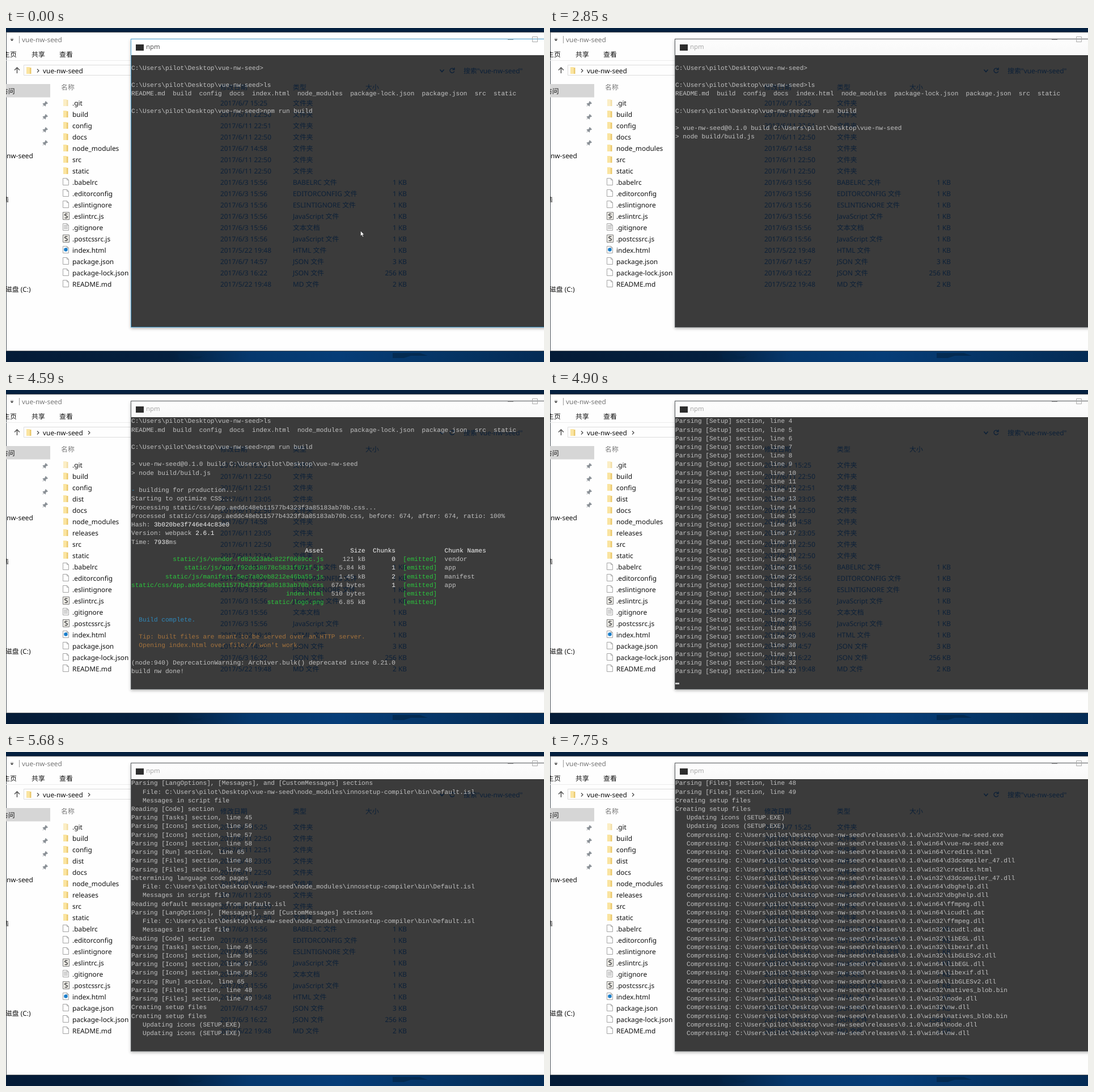
Recreate the animation shown at these times as an HTML page. Size 949x590 px, loop 8000 ms.

```html
<!DOCTYPE html>
<html lang="zh-CN">
<head>
<meta charset="utf-8">
<title>npm run build</title>
<style>
html, body { margin: 0; width: 100%; height: 100%; overflow: hidden; background: #fff; }
#stage { position: relative; width: 949px; height: 590px; overflow: hidden; background: #fefefe;
  font: 11.9px/20px "Noto Sans", "Open Sans", "Noto Sans CJK SC", "Noto Sans CJK", sans-serif;
  color: #111; text-rendering: geometricPrecision; }
#stage div, #stage svg, #stage pre { position: absolute; }
#stage .layer { left: 0; top: .5px; width: 949px; height: 590px; }
.t { white-space: pre; }
.gray { color: #777; }
#under .t { color: #0c2038; }
#panel { left: 220px; top: 19px; width: 740px; height: 508px; border: 1px solid #5a5e61;
  box-shadow: 0 2px 5px rgba(0,0,0,.3); background: #3b3b3b; }
#bar { left: 0; top: 0; width: 100%; height: 28px; background: linear-gradient(#fdfdfd, #f8f8f8); color: #aaa; }
#panel.active { border-color: #4ba3d3; }
.active #bar { background: #fff; color: #555; }
#term { left: 221px; top: 49.3px; margin: 0; color: #c2c2c2;
  font: 11.1px/15.23px "Liberation Mono", monospace; }
.w { color: #f4f4f4; } .g { color: #2bc53d; } .b { color: #2f88ba; } .o { color: #a5733d; }
#caret { left: 221px; width: 7px; height: 3px; background: #c8c8c8; }
#mouse { left: 0; top: 0; }
</style>
</head>
<body>
<div id="stage">
  <svg width="949" height="590">
    <defs>
      <linearGradient id="desk">
        <stop offset="0" stop-color="#041b37"/><stop offset=".31" stop-color="#04203f"/>
        <stop offset=".45" stop-color="#06386d"/><stop offset=".62" stop-color="#063d78"/>
        <stop offset=".85" stop-color="#053362"/><stop offset="1" stop-color="#042b55"/>
      </linearGradient>
      <g id="folder"><path d="M0 0h6v12h-6z" fill="#fae4a0"/><path d="M6 1h2.5v11h-2.5z" fill="#ebc96e"/></g>
      <path id="page" d="M.5.5h7l3 3v9h-10z M7.5.5v3h3" fill="#fff" stroke="#a4a4a4"/>
      <path id="pin" d="M5 0l4 4-1 1-1-.3-2 2 .2 2-1 .8-2-2-2.2 2.1-.5-.5 2-2.2-2-2 .8-1 2 .2 2-2-.3-1z" fill="#8a9096"/>
    </defs>
    <path d="M0 0h949v7H0z" fill="#04203f"/>
    <path d="M0 571h949v19H0z" fill="url(#desk)"/>
    <path d="M303 576h20l8 4h16l-6 4h-36z M682 574h48l14 5h-30l-12 4h-20z" fill="#042548" opacity=".7"/>
    <path d="M.5 7v564M0 7.5h949M0 570.5h949" stroke="#4c5359"/>
    <path d="M7.5 20h6l-3 3z" fill="#333"/>
    <path d="M8 18.5h5M23.5 14v13" stroke="#999"/>
    <path d="M0 57.5h221" stroke="#ececec"/>
    <path d="M221 65.5H31.5v18H221" fill="none" stroke="#dcdcdc"/>
    <path d="M19.5 80v-10m-4.5 4.5l4.5-4.5l4.5 4.5" fill="none" stroke="#5c5c5c" stroke-width="1.6"/>
    <use href="#folder" x="36" y="69"/>
    <path d="M55 72.5l3 3-3 3" fill="none" stroke="#444" stroke-width="1.2"/>
    <path id="chevron" d="M145 72.5l3 3-3 3" fill="none" stroke="#444" stroke-width="1.2"/>
    <path d="M0 99h78v23.5H0z" fill="#d6d6d6"/>
    <use href="#pin" x="65" y="129"/><use href="#pin" x="65" y="152"/>
    <use href="#pin" x="65" y="175"/><use href="#pin" x="65" y="198"/>
  </svg>
  <div id="side" class="layer"></div>
  <div id="files" class="layer"></div>
  <div id="panel">
    <div id="bar"><div class="t" style="left:26px;top:4px;font-size:11.4px">npm</div></div>
    <div style="left:8px;top:9px;width:14px;height:11px;background:#2d2d2d"></div>
  </div>
  <svg width="949" height="590" fill="none">
    <path d="M885 20.5h10" stroke="#999"/>
    <path d="M928.5 15.5h9v9h-9z" stroke="#aaa"/>
    <path d="M765.5 73.5l3.5 4 3.5-4" stroke="#0c2038" stroke-width="1.6"/>
    <path d="M790 72.5a4 4 0 1 0 .8 4M791 70v3.5h-3.5" stroke="#0c2038" stroke-width="1.3"/>
    <path d="M229 97l3-2 3 2" stroke="#2d2d2d"/>
  </svg>
  <div id="under" class="layer"></div>
  <pre id="term"></pre>
  <div id="caret"></div>
  <svg id="mouse" width="10" height="14"><path d="M.5.5v9l2-2 1.6 3.6 1.5-.7-1.6-3.4h2.7z" fill="#fff" stroke="#222" stroke-width=".5"/></svg>
</div>
<script>
const $ = id => document.getElementById(id);
const text = (s, x, y, cls = "") => `<div class="t ${cls}" style="left:${x}px;top:${y - 10}px">${s}</div>`;
const textEnd = (s, x, y) => `<div class="t" style="right:${949 - x}px;top:${y - 10}px">${s}</div>`;
const span = (cls, s) => `<span class="${cls}">${s}</span>`;
const range = (a, b) => Array.from({ length: b - a + 1 }, (_, i) => a + i);
const twice = s => [s, s];

// Console log
const root = "C:\\Users\\pilot\\Desktop\\vue-nw-seed";
const bin = name => `   File: ${root}\\node_modules\\innosetup-compiler\\bin\\${name}`;
const section = (name, line) => `Parsing [${name}] section, line ${line}`;
const css = "static/css/app.aeddc48eb11577b4323f3a85183ab70b.css";
const asset = (file, size, chunk, name) =>
  span("g", file.padStart(51)) + size.padStart(11) + span("w", chunk.padStart(8)) +
  span("g", "  [emitted]  ") + name;
const wizard = [
  "Reading file (WizardImageFile)", bin("WIZMODERNIMAGE.BMP"),
  "Reading file (WizardSmallImageFile)", bin("WIZMODERNSMALLIMAGE.BMP"),
  "Preparing Setup program executable"
];
const script = [
  "Determining language code pages", bin("Default.isl"), "   Messages in script file",
  "Reading default messages from Default.isl",
  "Parsing [LangOptions], [Messages], and [CustomMessages] sections",
  bin("Default.isl"), "   Messages in script file", "Reading [Code] section",
  section("Tasks", 45), ...[56, 57, 58].map(n => section("Icons", n)),
  section("Run", 65), section("Files", 48), section("Files", 49)
];
const packed = `32 vue-nw-seed.exe,64 vue-nw-seed.exe,64 credits.html,64 d3dcompiler_47.dll,32 credits.html,
32 d3dcompiler_47.dll,64 dbghelp.dll,32 dbghelp.dll,64 ffmpeg.dll,64 icudtl.dat,32 ffmpeg.dll,32 icudtl.dat,
32 libEGL.dll,32 libexif.dll,32 libGLESv2.dll,64 libEGL.dll,64 libexif.dll,64 libGLESv2.dll,
32 natives_blob.bin,32 node.dll,32 nw.dll,64 natives_blob.bin,64 node.dll,64 nw.dll`
  .split(/,\s*/).map(s => `   Compressing: ${root}\\releases\\0.1.0\\win${s.replace(" ", "\\")}`);

const log = [
  "", root + "&gt;", "", root + "&gt;ls",
  "README.md  build  config  docs  index.html  node_modules  package-lock.json  package.json  src  static",
  "", root + "&gt;npm run build", "",
  `&gt; vue-nw-seed@0.1.0 build ${root}`, "&gt; node build/build.js", "",
  span("b", "-") + " building for production...", "Starting to optimize CSS...",
  `Processing ${css}...`, `Processed ${css}, before: 674, after: 674, ratio: 100%`,
  "Hash: " + span("w", "3b020be3f746e44c83e0"), "Version: webpack " + span("w", "2.6.1"),
  "Time: " + span("w", "7938") + "ms",
  span("w", "Asset".padStart(51) + "Size".padStart(11) + "Chunks".padStart(8) + " ".repeat(13) + "Chunk Names"),
  asset("static/js/vendor.fd82d23abc822f0689cc.js", "121 kB", "0", "vendor"),
  asset("static/js/app.f92dc18678c5831f871f.js", "5.84 kB", "1", "app"),
  asset("static/js/manifest.5ec7a02eb8212e46ba55.js", "1.45 kB", "2", "manifest"),
  asset(css, "674 bytes", "1", "app"),
  asset("index.html", "510 bytes", "", ""), asset("static/logo.png", "6.85 kB", "", ""),
  "", span("b", "  Build complete."), "",
  span("o", "  Tip: built files are meant to be served over an HTTP server."),
  span("o", "  Opening index.html over file:// won't work."), "",
  "(node:940) DeprecationWarning: Archiver.bulk() deprecated since 0.21.0", "build nw done!",
  ...range(1, 42).map(n => section("Setup", n)),
  `Creating output directory: ${root}\\releases\\0.1.0\\win32-setup`,
  "Reading file (LicenseFile)", ...wizard, ...wizard,
  ...twice("   Updating icons (SETUP.E32)"), ...script, ...script,
  ...twice("Creating setup files"), ...twice("   Updating icons (SETUP.EXE)"), ...packed
];

// Each step: start, first visible line, line count, caret row (-1 hides it)
const done = log.indexOf("build nw done!");
const setup = n => done + n;
const wide = (t, top, caret = -1) => [t, top, 30, caret];
const steps = [
  [0, 0, 7, -1], [250, 0, 7, 7], [450, 0, 10, -1], [1340, 0, 10, 11], [1860, 0, 10, -1],
  [2350, 0, 10, 11], [2850, 0, 10, -1], [3750, 1, 29, -1],
  wide(4590, done - 29), wide(4760, done - 20), wide(4900, setup(4), 30), wide(5020, setup(21)),
  wide(5160, setup(27)), wide(5560, setup(44), 30), wide(5680, setup(61)), wide(5800, setup(63)),
  wide(5940, setup(67)), wide(6060, setup(73)), wide(7750, setup(85))
];

const pointer = [[0, 625, 358], [1740, 708, 448], [1860, 792, 534], [2110, 793, 550], [2230, -20, 0]];

// Explorer
const dir = (name, date, fresh) => ({ name, date, fresh, type: "文件夹", size: "" });
const file = (name, type, date = "2017/6/3 15:56", size = "1 KB") => ({ name, date, type, size });
const june = "2017/6/11 ";
const entries = [
  dir(".git", "2017/6/7 15:25"), dir("build", june + "22:50"), dir("config", june + "22:51"),
  dir("dist", june + "23:05", true), dir("docs", june + "22:50"), dir("node_modules", "2017/6/7 14:58"),
  dir("releases", june + "23:05", true), dir("src", june + "22:50"), dir("static", june + "22:50"),
  file(".babelrc", "BABELRC 文件"), file(".editorconfig", "EDITORCONFIG 文件"),
  file(".eslintignore", "ESLINTIGNORE 文件"), file(".eslintrc.js", "JavaScript 文件"),
  file(".gitignore", "文本文档"), file(".postcssrc.js", "JavaScript 文件"),
  file("index.html", "HTML 文件", "2017/5/22 19:48"),
  file("package.json", "JSON 文件", "2017/6/7 14:57", "3 KB"),
  file("package-lock.json", "JSON 文件", "2017/6/3 16:22", "256 KB"),
  file("README.md", "MD 文件", "2017/5/22 19:48", "2 KB")
];

$("side").innerHTML =
  text("vue-nw-seed", 28, 20, "gray") + text("主页", -5, 46) + text("共享", 45, 46) +
  text("查看", 94, 46) + text("vue-nw-seed", 65, 75) + text("名称", 97, 104, "gray") +
  text("快速访问", -32, 111) + text("vue-nw-seed", -23, 225) + text("此电脑", -31, 302) +
  text("本地磁盘 (C:)", -25, 461);

function icon({ name, size }) {
  if (!size) return `<use href="#folder" x="1" y="4" opacity="${name === ".git" ? .6 : 1}"/>`;
  let mark = "";
  if (name.endsWith(".js")) mark = '<path d="M.5 3.5h11v13h-11z" fill="#f4f2ec" stroke="#777"/><path d="M8.5 6.5h-4l-1 2 5 2.5-1 2.5h-4" fill="none" stroke="#444" stroke-width="1.4"/>';
  if (name === ".gitignore") mark = '<path d="M2 6.5h7m-7 2h7m-7 2h7m-7 2h7" stroke="#aaa"/>';
  if (name === "index.html") mark = '<circle cx="5.5" cy="9.5" r="3.3" fill="#1b7ec9"/>';
  return `<use href="#page" y="3"/>` + mark;
}

function drawFiles(built, touched) {
  let list = "", details = text("修改日期", 378, 104) + text("类型", 506, 104) + text("大小", 634, 104) +
    text('搜索"vue-nw-seed"', 807, 75);
  entries.filter(e => built || !e.fresh).forEach((e, i) => {
    const y = 132 + 20 * i;
    const date = touched && e.name === "config" ? june + "23:05" : e.date;
    list += `<svg width="14" height="20" style="left:100px;top:${y - 10.5}px">${icon(e)}</svg>` + text(e.name, 117, y);
    details += text(date, 378, y) + text(e.type, 506, y) + textEnd(e.size, 707, y);
  });
  $("files").innerHTML = list;
  $("under").innerHTML = details;
}

const at = (list, t) => list.filter(s => s[0] <= t).pop();
let shownStep, shownFiles;

function draw(t) {
  const step = at(steps, t);
  if (step !== shownStep) {
    shownStep = step;
    const [, top, count, caret] = step;
    $("term").innerHTML = log.slice(top, top + count).map(s => s || " ").join("\n");
    $("caret").style.display = caret < 0 ? "none" : "block";
    $("caret").style.top = 59.8 + 15.23 * caret + "px";
  }
  const built = t >= 3750, touched = t >= 6440, key = `${built} ${touched}`;
  if (key !== shownFiles) drawFiles(built, touched);
  shownFiles = key;
  $("chevron").style.display = built && (t < 6320 || t >= 6690) ? "" : "none";
  $("panel").className = t < 2850 ? "active" : "";
  const [, x, y] = at(pointer, t);
  $("mouse").style.transform = `translate(${x}px,${y}px)`;
}

const start = performance.now();
function tick() {
  draw((performance.now() - start) % 8000);
  requestAnimationFrame(tick);
}
tick();
</script>
</body>
</html>
```
